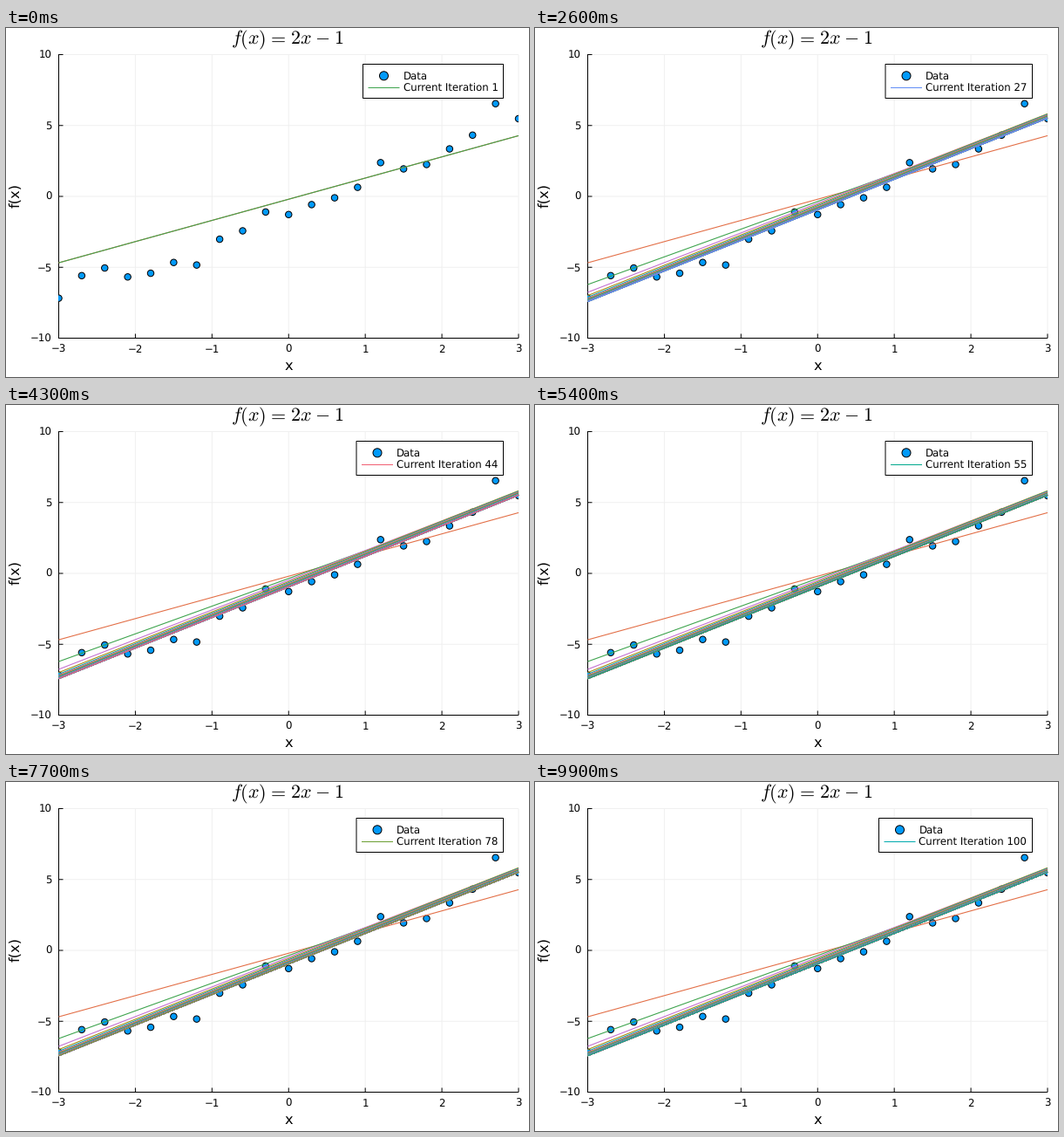
A matplotlib script for the animation above (10 s loop, 600x400 px).

```python
import numpy as np
import matplotlib.pyplot as plt
from matplotlib.animation import FuncAnimation
from matplotlib.patches import Circle, Rectangle

plt.rcParams.update({
    "font.family": "DejaVu Sans",
    "mathtext.fontset": "cm",
    "text.hinting": "none",
    "lines.solid_capstyle": "butt",
    "path.snap": False,
})

PX = 0.72  # points per pixel at 100 dpi
STEPS = 100
RATE = 0.01
PALETTE = ["#009afa", "#e36f47", "#3ea44e", "#c371d2", "#ac8e18", "#00aaae",
           "#ed5e93", "#c68225", "#00a98d", "#8e971e", "#00a9cc", "#9b7fe9",
           "#618df6", "#f06073", "#dd65b6", "#6c9f33"]
LEFT, RIGHT, TOP, BOTTOM = 60.5, 588, 30.5, 355.5


def sx(x):
    return LEFT + (np.asarray(x) + 3) / 6 * (RIGHT - LEFT)


def sy(y):
    return BOTTOM - (np.asarray(y) + 10) / 20 * (BOTTOM - TOP)


def color(i):
    return PALETTE[(i - 1) % len(PALETTE)]


xs = np.linspace(-3, 3, 21)
ys = np.array([-7.18, -5.59, -5.05, -5.68, -5.42, -4.66, -4.84, -3.02, -2.43,
               -1.10, -1.28, -0.58, -0.10, 0.64, 2.38, 1.94, 2.25, 3.35, 4.32,
               6.54, 5.48])

# Gradient descent on the squared error, starting from zero
fits = []
m = b = 0.0
for _ in range(STEPS):
    err = ys - (m * xs + b)
    m, b = m + RATE * err @ xs, b + RATE * err.sum()
    fits.append((m, b))

fig = plt.figure(figsize=(6, 4), dpi=100, facecolor="white")
ax = fig.add_axes([0, 0, 1, 1])
ax.set(xlim=(0, 600), ylim=(400, 0))
ax.axis("off")
area = Rectangle((60, 30), 528, 326, transform=ax.transData)


def stroke(x, y, c="black", w=1.0, z=1):
    return ax.plot(x, y, color=c, lw=w * PX, zorder=z)[0]


def label(x, y, s, size=11.8, z=1, **kw):
    kw.setdefault("va", "baseline")
    return ax.text(x, y, s, fontsize=size * PX, zorder=z, **kw)


def dot(x, y, size, z):
    return ax.add_patch(Circle((x, y), size / 2, fc=PALETTE[0], ec="black",
                               lw=PX, zorder=z))


def number(v):
    return str(v).replace("-", "\u2212")


for v in range(-3, 4):
    x = sx(v)
    stroke([x, x], [TOP, BOTTOM], "#f0f0f0", z=0)
    stroke([x, x], [BOTTOM, BOTTOM - 5])
    label(x, 372, number(v), ha="center")
for v in range(-10, 11, 5):
    y = sy(v)
    stroke([LEFT, RIGHT], [y, y], "#f0f0f0", z=0)
    stroke([LEFT, LEFT + 5], [y, y])
    label(52.8, y + 4.3, number(v), ha="right")
stroke([LEFT, LEFT], [30, 356])
stroke([60, RIGHT], [BOTTOM, BOTTOM])

label(324, 392, "x", 16.3, ha="center")
label(18.4, 192, "f(x)", 16.3, rotation=90, ha="right", va="center")
label(323, 19,
      r"$f(x)\hspace{0.078}=\hspace{0.078}2x\hspace{0.05}-\hspace{0.05}1$",
      22, ha="center")

for x, y in zip(sx(xs), sy(ys)):
    dot(x, y, 7.4, 2).set_clip_path(area)

ends = np.array([-3, 3])
trail = [stroke(sx(ends), sy(m * ends + b), color(k + 2), 1.1, 3)
         for k, (m, b) in enumerate(fits)]
current = stroke(sx(ends), sy(ends), w=1.1, z=4)

box = ax.add_patch(Rectangle((0, 41.5), 1, 39, fc="white", ec="black",
                             lw=PX, zorder=5))
key_dot = dot(0, 54.8, 10, 6)
key_line = stroke([0, 1], [68.5, 68.5], z=6)
key_data = label(0, 59, "Data", z=6)
key_text = label(0, 72, "", z=6)


def draw(i):
    n = i + 1
    for k, line in enumerate(trail):
        line.set_visible(k < n)
    m, b = fits[i]
    current.set_ydata(sy(m * ends + b))
    current.set_color(color(n + 2))

    x = 409.5 - 7.5 * (len(str(n)) - 1)
    box.set_x(x)
    box.set_width(570.5 - x)
    key_dot.set_center((x + 24, 54.8))
    key_line.set_xdata([x + 6, x + 42])
    key_line.set_color(color(n + 2))
    key_data.set_x(x + 46)
    key_text.set_x(x + 46)
    key_text.set_text(f"Current Iteration {n}")
    return []


anim = FuncAnimation(fig, draw, frames=STEPS, interval=100, repeat=True,
                     repeat_delay=0, blit=False)
plt.show()
```
